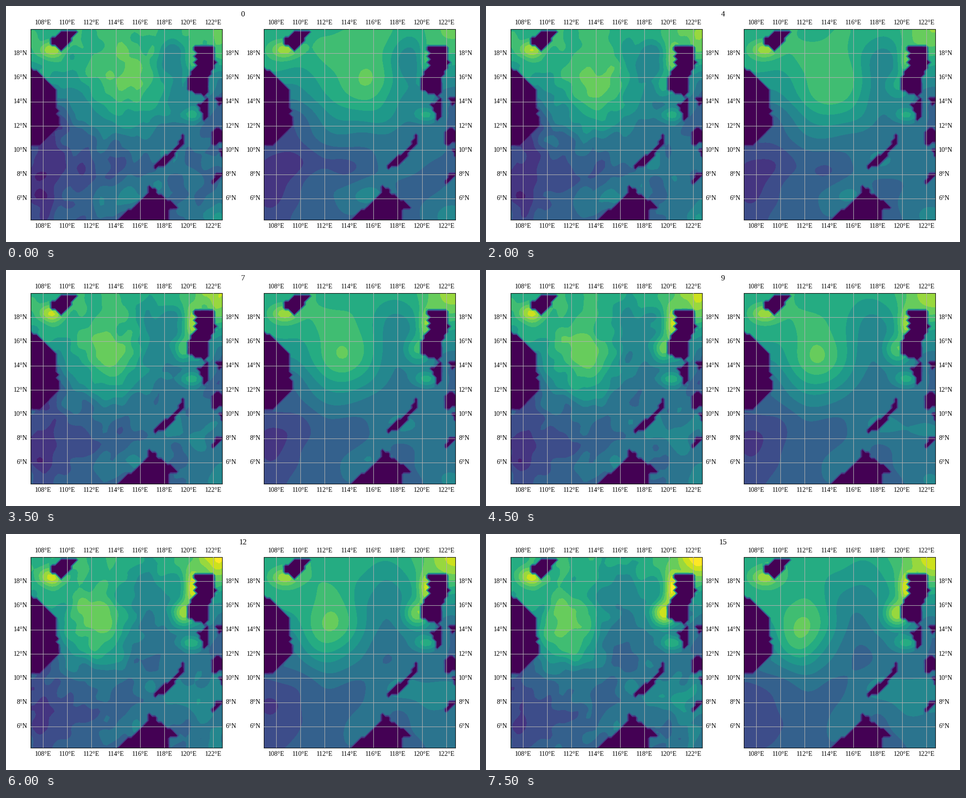
Animation, 1000 px wide and 500 px high, one loop 8 s. Source, as a matplotlib script:

```python
import numpy as np
import matplotlib.pyplot as plt
from matplotlib.animation import FuncAnimation

plt.rcParams["font.family"] = "Liberation Serif"

N = 64                      # quarter-degree grid
FRAMES = 16
LEVELS = np.arange(15)
LON = 107 + 0.25 * np.arange(N)
LAT = 4.25 + 0.25 * np.arange(N)
X, Y = np.meshgrid(LON, LAT)


def island(land, *keys):
    """Fill grid cells between key rows (row, first column, last column)."""
    rows, first, last = np.array(sorted(keys)).T
    for r in range(rows[0], rows[-1] + 1):
        a, b = (int(np.interp(r, rows, e) + 0.5) for e in (first, last))
        land[r, a:b + 1] = True


def make_land():
    land = np.zeros((N, N), bool)
    island(land, (50, 0, 0), (49, 0, 2), (43, 0, 8), (31, 0, 9), (25, 0, 3))
    island(land, (62, 10, 15), (60, 7, 13), (58, 7, 12), (56, 10, 10))
    island(land, (57, 54, 60), (50, 54, 60), (47, 52, 58), (43, 52, 58),
           (42, 54, 58), (41, 57, 57))
    island(land, (40, 58, 58), (38, 55, 58), (34, 57, 58), (33, 57, 57))
    island(land, (40, 61, 63), (38, 62, 62))
    island(land, (30, 61, 62), (29, 60, 63), (26, 60, 63), (25, 60, 61))
    island(land, (23, 62, 63), (21, 63, 63))
    island(land, (15, 61, 63), (12, 60, 60))
    island(land, (28, 50, 50), (25, 49, 50), (23, 47, 48), (20, 43, 46),
           (18, 41, 44), (17, 41, 41))
    island(land, (11, 39, 39), (9, 39, 41), (6, 36, 46), (4, 34, 48),
           (3, 32, 45), (0, 29, 45))
    land[35:39:2, 9] = False    # toothed coasts
    land[51:56:2, 54] = False
    land[52, 61] = land[10, 41] = True
    return land


LAND = make_land()


def mix(a, b, u):
    return a + (b - a) * u


def bump(u, at, size, amp, to=None, grow=1):
    """Gaussian high or low drifting from at to to, amp = (start, end)."""
    x, y = mix(np.array(at), np.array(to or at), u)
    w, h = np.array(size) * mix(1, grow, u)
    return mix(*amp, u) * np.exp(-((X - x) / w) ** 2 / 2 - ((Y - y) / h) ** 2 / 2)


def eddies(u):
    return (
        # warm and cold cores drifting west
        bump(u, (115, 15.3), (2.0, 2.5), (2.7, 4.0), to=(111.8, 13.7), grow=0.8)
        + bump(u, (118.8, 17.4), (1.3, 1.5), (-2.3, -1.9), to=(116, 17), grow=1.4)
        + bump(u, (119, 13), (1.2, 1.6), (0, -1.2), to=(116.3, 12.8))
        # western and southern cool water
        + bump(u, (107.6, 7.5), (1.8, 3.0), (-2.4, -1.7))
        + bump(u, (109.3, 12.3), (1.3, 2.0), (-1.7, 0.3))
        + bump(u, (113, 8.7), (2.8, 1.0), (-1.4, -0.6), to=(112.5, 7))
        + bump(u, (123, 14), (1.8, 2.0), (-2.0, -1.8))
        # southern and eastern warm water
        + bump(u, (115.2, 6.3), (1.6, 1.0), (1.9, 1.2))
        + bump(u, (118, 9), (1.1, 1.0), (1.1, 1.2))
        + bump(u, (121.7, 8.3), (2.2, 1.4), (0.2, 2.4))
        + bump(u, (122.5, 4.5), (1.6, 1.0), (2.0, 1.4))
        + bump(u, (122.7, 20), (1.7, 1.5), (1.8, 4.8))
        # coastal hot spots
        + bump(u, (108.7, 18.3), (0.8, 0.5), (3.4, 3.4))
        + bump(u, (120.4, 17.4), (0.5, 0.9), (2.4, 5.0))
        + bump(u, (119.6, 15.3), (0.7, 0.7), (0, 5.4))
        + bump(u, (120.4, 12.9), (0.7, 0.4), (3.0, 3.2))
    )


def waves(seed, count, shortest, longest, size):
    """Ripples: random plane waves whose phases drift slowly."""
    rng = np.random.default_rng(seed)
    angle, phase = rng.uniform(0, 2 * np.pi, (2, count))
    k = 2 * np.pi / rng.uniform(shortest, longest, count)
    drift = rng.uniform(-3, 3, count)

    def field(u):
        return size * sum(
            np.sin(q * (X * np.cos(a) + Y * np.sin(a)) + p + d * u)
            for q, a, p, d in zip(k, angle, phase, drift))
    return field


def sea(u, gain, ripples):
    base = 4.6 + 4.4 / (1 + np.exp((14 - Y) / 2))
    z = np.clip(base + gain * eddies(u) + ripples(u), 1.2, 13.8)
    return np.where(LAND, 0, z)


def panel(left):
    ax = fig.add_axes([left / 1000, 47.2 / 500, 404 / 1000, 404 / 500])
    ax.set(xlim=(LON[0], LON[-1]), ylim=(LAT[0], LAT[-1]))
    lons, lats = range(108, 123, 2), range(6, 19, 2)
    ax.set_xticks(lons, [f"{v}°E" for v in lons])
    ax.set_yticks(lats, [f"{v}°N" for v in lats], va="center")
    ax.tick_params(length=0, pad=5, labeltop=True, labelright=True)
    ax.set_axisbelow(False)
    ax.grid(color="#b0b0b0", lw=0.8)
    return ax


fig = plt.figure(figsize=(10, 5), dpi=100)
title = fig.suptitle("0")
panels = [(panel(52.2), 1.0, waves(4, 40, 1.2, 4, 0.07)),
          (panel(544.2), 0.86, waves(9, 16, 3, 6, 0.05))]
fills = []


def draw(i):
    while fills:
        fills.pop().remove()
    for ax, gain, ripples in panels:
        fills.append(ax.contourf(LON, LAT, sea(i / (FRAMES - 1), gain, ripples),
                                 levels=LEVELS, cmap="viridis",
                                 vmin=0.5, vmax=13.5, zorder=1))
    title.set_text(str(i))
    return []


anim = FuncAnimation(fig, draw, frames=FRAMES, init_func=lambda: [],
                     interval=500, repeat=True, repeat_delay=0)
plt.show()
```
